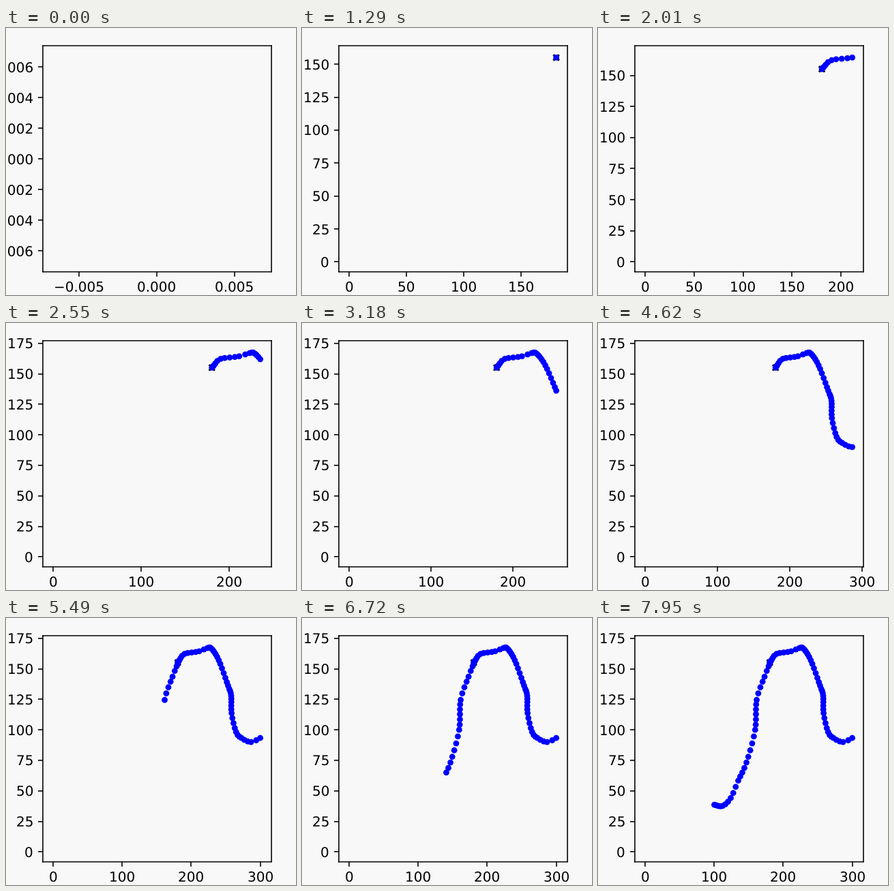
An HTML page that plays this animation: 425 px wide and 392 px high, repeating every 8 s.

```html
<!DOCTYPE html>
<html lang="en">
<head>
<meta charset="utf-8">
<title>Growing trail plot</title>
<style>
  html, body { margin: 0; width: 100%; height: 100%; overflow: hidden; background: #f8f8f8; }
  svg { display: block; width: 425px; height: 392px; }
  text { font: 20px "DejaVu Sans", sans-serif; text-rendering: geometricPrecision; }
  .line { fill: none; stroke: #000; stroke-width: 1.6; }
  .spine { stroke-linecap: square; }
  .cross { stroke: #000; stroke-width: 3; }
  .dot { fill: #00f; }
</style>
</head>
<body>
<svg id="plot" viewBox="0 0 425 392"></svg>
<script>
const LOOP = 8000;
const BOX = { left: 54, right: 389, top: 26, bottom: 358 };
const ORIGIN = { x: 69, y: 343.42 };
const REACH = { x: 303.6, y: 300 };

// Key points of each smooth branch: x, y, dots since the previous key.
const rightBranch = [
  [180.5, 155.05, 1], [182.8, 157, 4], [190.5, 162.2, 3], [211.5, 164.3, 4], [223.4, 167, 2],
  [229.6, 166.4, 3], [240, 157, 5], [253.4, 136.2, 6], [257.9, 128, 4], [258.5, 113.7, 5],
  [265, 98.3, 4], [272.8, 93.3, 3], [286.6, 90, 3], [300, 93.3, 2]
];
const leftBranch = [
  [180.9, 154.7, 1], [173, 143.5, 3], [161.6, 124.5, 4], [159.4, 100, 6], [146.8, 73.3, 5],
  [134.9, 58.4, 4], [124, 44.1, 3], [112.2, 37.7, 3], [100.3, 38.6, 5]
];

// Catmull-Rom value at t between b and c.
const spline = (a, b, c, d, t) =>
  b + t / 2 * (c - a + t * (2 * a - 5 * b + 4 * c - d + t * (3 * (b - c) + d - a)));

function dotsAlong(keys) {
  const key = i => keys[Math.min(Math.max(i, 0), keys.length - 1)];
  return keys.flatMap(([, , n], i) => Array.from({ length: n }, (_, k) =>
    [0, 1].map(axis => spline(...[-2, -1, 0, 1].map(o => key(i + o)[axis]), (k + 1) / n))));
}

const points = [...dotsAlong(rightBranch), ...dotsAlong(leftBranch)];

// Dots arrive ever more slowly, on a 30 ms clock.
const arrival = n => Math.round((1290 + 61.5 * n + 0.24 * n * n) / 30) * 30;
const times = points.map((_, n) => arrival(n));

const EM = { ".": 0.318, "\u2212": 0.838 };
const widthOf = label => [...label].reduce((sum, c) => sum + 20 * (EM[c] || 0.636), 0);
const textAt = (x, y, label) => `<text x="${Math.round(x)}" y="${y}">${label}</text>`;
const line = (d, extra = "") => `<path class="line ${extra}" d="${d}"/>`;

const xTick = (x, label) =>
  line(`M${Math.round(x)} ${BOX.bottom}v7`) + textAt(x - widthOf(label) / 2, 387, label);
const yTick = (y, label) =>
  line(`M${BOX.left} ${Math.round(y)}h-7`) + textAt(40 - widthOf(label), Math.floor(y + 8), label);

const frame = [BOX.left, BOX.right].map(x => line(`M${x} ${BOX.top}V${BOX.bottom}`, "spine")).join("")
  + [BOX.top, BOX.bottom].map(y => line(`M${BOX.left} ${y}H${BOX.right}`, "spine")).join("");
const decimal = v => v.toFixed(3).replace("-", "\u2212");

function emptyPlot() {
  let out = frame;
  for (let k = -1; k <= 1; k++) out += xTick(221 + 114 * k, decimal(k * 0.005 || 0));
  for (let k = -3; k <= 3; k++) out += yTick(192 - 45 * k, decimal(k * 0.002 || 0));
  return out;
}

function filledPlot(count) {
  const shown = points.slice(0, count);
  const sx = REACH.x / Math.max(...shown.map(p => p[0]));
  const sy = REACH.y / Math.max(...shown.map(p => p[1]));
  const toX = x => ORIGIN.x + x * sx;
  const toY = y => ORIGIN.y - y * sy;
  const stepX = (BOX.right - BOX.left) / sx > 250 ? 100 : 50;

  let out = frame;
  for (let v = 0; toX(v) <= BOX.right; v += stepX) out += xTick(toX(v), String(v));
  for (let v = 0; toY(v) >= BOX.top - 0.5; v += 25) out += yTick(toY(v), String(v));

  const [x0, y0] = points[0];
  out += `<path class="cross" transform="translate(${toX(x0)} ${toY(y0)})" d="M-4.2-4.2L4.2 4.2M-4.2 4.2L4.2-4.2"/>`;
  for (const [x, y] of shown) out += `<circle class="dot" cx="${toX(x)}" cy="${toY(y)}" r="4.4"/>`;
  return out;
}

const plot = document.getElementById("plot");
const start = performance.now();
let drawn = -1;

function render(now) {
  const t = Math.max(now - start, 0) % LOOP;
  const count = times.filter(at => at <= t).length;
  if (count !== drawn) {
    plot.innerHTML = count ? filledPlot(count) : emptyPlot();
    drawn = count;
  }
  requestAnimationFrame(render);
}
render(start);
</script>
</body>
</html>
```
